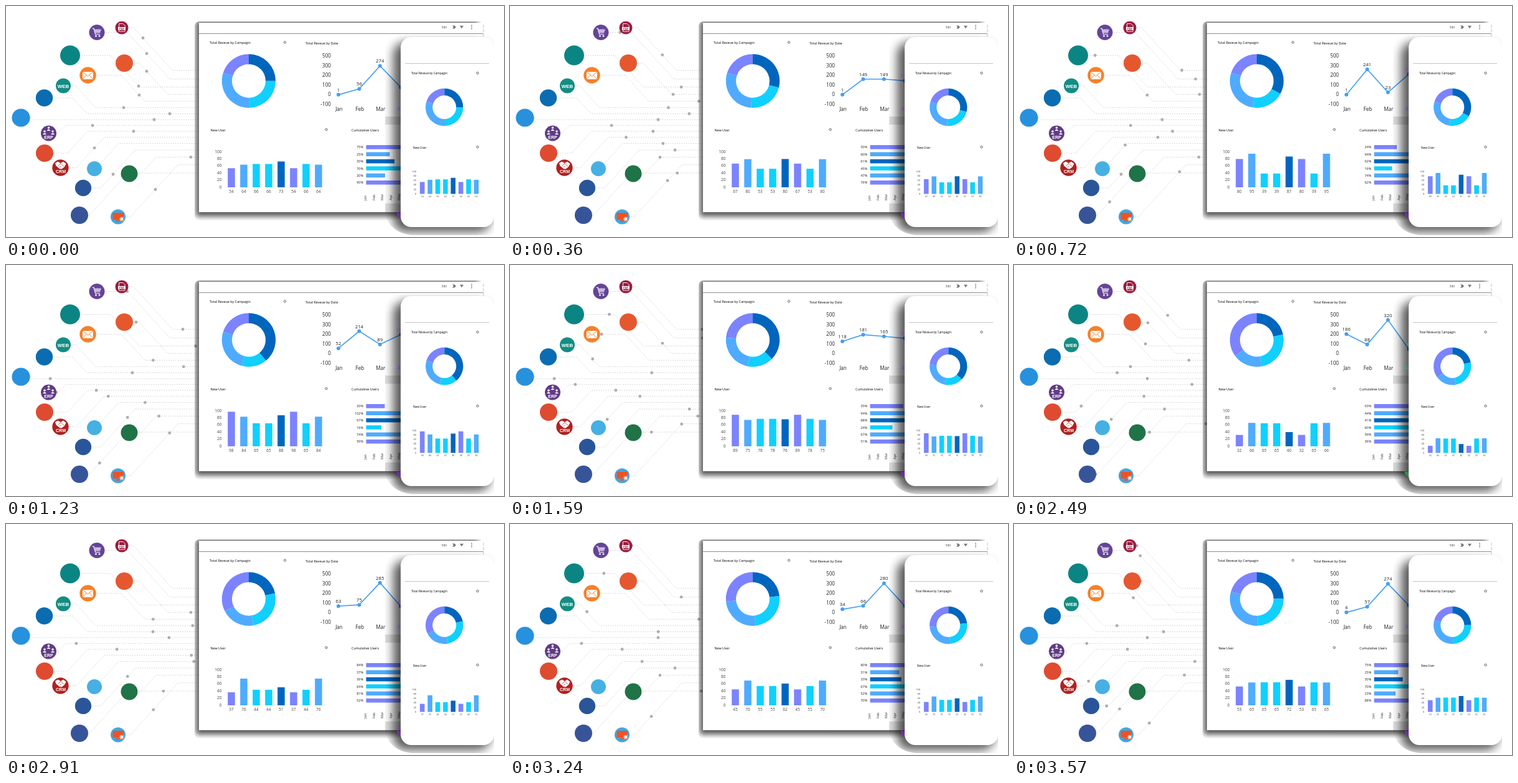
Recreate the animation shown at these times as an HTML page. Size 800 by 372 pixels, loop 3.6 s.

```html
<!DOCTYPE html>
<html lang="en">
<head>
<meta charset="utf-8">
<title>Dashboard</title>
<style>
html, body { margin: 0; width: 100%; height: 100%; overflow: hidden; background: #fff; }
svg { display: block; width: 800px; height: 372px; font-family: "Open Sans", "Noto Sans", sans-serif; }
</style>
</head>
<body>
<svg id="stage" viewBox="0 0 800 372" xmlns="http://www.w3.org/2000/svg">
  <defs>
    <filter id="soft" x="-20%" y="-20%" width="140%" height="140%"><feGaussianBlur stdDeviation="4"/></filter>
    <filter id="wide" x="-30%" y="-20%" width="160%" height="140%"><feGaussianBlur stdDeviation="8"/></filter>
    <clipPath id="winClip"><rect x="303" y="25" width="464" height="320" rx="7"/></clipPath>
    <clipPath id="phoneClip"><path d="M609 64Q612 46 634 47H784V369H652Q620 366 609 338Z"/></clipPath>
  </defs>
  <g id="wires"></g>
  <g id="dots"></g>
  <g id="badges"></g>
  <g clip-path="url(#winClip)"><rect x="305" y="24" width="454" height="315" fill="#000" opacity=".65" filter="url(#soft)"/></g>
  <path d="M310 27H766V332H310Z" fill="#fff"/>
  <path d="M310 44.5H767" stroke="#8c8c8c"/>
  <path d="M767 30V50" stroke="#c4c4c4" stroke-dasharray="5 2"/>
  <g id="panel"></g>
  <path d="M609 178H634V191H609ZM609 318H634V332H609Z" opacity=".12"/>
  <g clip-path="url(#phoneClip)"><rect x="622" y="58" width="156" height="306" rx="20" fill="#000" opacity=".65" filter="url(#wide)"/></g>
  <g id="edge"></g>
  <rect x="634" y="50" width="150" height="306" rx="17" fill="#fff"/>
  <path d="M641 92.5H776" stroke="#b5b5b5" stroke-width=".8"/>
  <g id="phone"></g>
</svg>
<script>
const STEP = 30, FRAMES = 120;
const PURPLE = '#7b83ff', BLUE = '#4fabff', CYAN = '#0fd0ff', NAVY = '#0066bd';
const [wires, dots, badges, panel, edge, phone] =
  ['wires', 'dots', 'badges', 'panel', 'edge', 'phone'].map(id => document.getElementById(id));

function set(el, attrs) {
  for (const k in attrs) el.setAttribute(k, attrs[k]);
  return el;
}
function add(parent, tag, attrs, text = '') {
  const el = set(document.createElementNS('http://www.w3.org/2000/svg', tag), attrs);
  el.textContent = text;
  return parent.appendChild(el);
}
function label(parent, x, y, size, text, anchor = 'start', fill = '#222') {
  return add(parent, 'text', { x, y, 'font-size': size, 'text-anchor': anchor, fill }, text);
}

// A series runs straight through its evenly spaced values and back to the first
function at(values, frame) {
  const p = frame / FRAMES * values.length, i = Math.floor(p);
  return values[i] + (values[(i + 1) % values.length] - values[i]) * (p - i);
}

// ---- sources: badge, wire and travelling dot ----
const PACE = 23, SLOPE = 1.1, WALL = 310;
const lane = d => 183 + 9.4 * d - .07 * d * d + .03 * d ** 3;

// bend: where the wire leaves the badge's level; dot: where its dot is at time zero
function source(order, x, y, r, fill, bend, dot) {
  const end = lane(order - 7), dir = Math.sign(end - y);
  const level = px => px < bend ? y : dir * Math.min(dir * end, dir * y + (px - bend) * SLOPE);
  const flat = bend + Math.abs(end - y) / SLOPE;
  add(wires, 'path', { d: `M${x} ${y}H${bend}L${flat} ${end}H${WALL}`, fill: 'none', stroke: '#c0c0c0', 'stroke-width': .8, 'stroke-dasharray': '1.5 2.2' });
  add(badges, 'circle', { cx: x, cy: y, r, fill });
  const el = add(dots, 'circle', { r: 2.4, fill: '#adadad' });
  const width = WALL - x, laps = Math.round(PACE * FRAMES / width);
  return frame => {
    const px = x + (dot - x + width * laps * frame / FRAMES) % width;
    set(el, { cx: px, cy: level(px) });
  };
}
const flow = [
  [186, 35, 10.5, '#9c1c3f', 205, 220],
  [146, 42.5, 12.5, '#654594', 195, 226],
  [103, 79.5, 16, '#0a8583', 168, 213],
  [190, 92, 14, '#e5582f', 214, 226],
  [131.5, 111.5, 13.2, '#f68029', 185, 214],
  [92, 128.5, 12, '#138d83', 112, 189],
  [61.5, 148, 13.7, '#0b6cb2', 107, 263],
  [24, 180, 14.6, '#2791de', 40, 238],
  [68.5, 205, 12.5, '#603c86', 84, 139],
  [62, 237, 14, '#de4b30', 99, 205],
  [87.5, 260.5, 13.2, '#b1211f', 113, 142],
  [142, 262, 12, '#46b0e3', 144, 145],
  [124, 293, 13.2, '#2a5699', 152, 172],
  [198, 270, 13.5, '#207346', 217, 297],
  [180, 339.5, 12, '#41a7de', 200, 240],
  [118, 337, 14, '#385499', 134, 192]
].map((row, n) => source(n, ...row));

// ---- badge symbols ----
function draw(d, attrs) {
  add(badges, 'path', { d, fill: '#fff', ...attrs });
}
function outline(d, stroke = '#fff', width = 1) {
  draw(d, { fill: 'none', stroke, 'stroke-width': width });
}
function caption(x, y, size, text, fill = '#fff') {
  set(label(badges, x, y, size, text, 'middle', fill), { 'font-weight': 700, 'font-family': 'Liberation Sans, sans-serif' });
}
function spot(cx, cy, r) {
  add(badges, 'circle', { cx, cy, r, fill: '#fff' });
}
outline('M181.5 28.5H188L191 31.5V41H181.5Z', '#fff', .9);
draw('M180 34H192V38.5H180Z');
caption(186, 37.8, 4, 'PDF', '#9c1c3f');

outline('M138.5 36H141L143.5 45.5H151', '#fff', 1.2);
draw('M142 37.5H153L151 43.5H143.6Z', { fill: '#c9b8e6' });
spot(144.5, 48.3, 1.4);
spot(150, 48.3, 1.4);

draw('M123 106H140V118H123Z');
outline('M123 106L131.5 113L140 106M123 118L129 111.5M140 118L134 111.5', '#f68029');

caption(92, 131.5, 8, 'WEB');

for (const [x, y] of [[68.5, 196], [62, 202], [75, 202]]) {
  spot(x, y, 1.8);
  draw(`M${x - 3} ${y + 5}Q${x} ${y} ${x + 3} ${y + 5}Z`);
}
caption(68.5, 213.5, 7, 'ERP');

draw('M79 253L83 250.5L88 253L92 250.5L96.5 254L94 259L89.5 262.5L86 262L80.5 257.5Z');
outline('M84 257L88 253.5L93 258.5M86 260L88.5 257.5', '#b1211f', .8);
caption(88, 269, 7, 'CRM');

draw('M171.5 333H189V344H171.5ZM177 345H183V347H177Z', { fill: '#ee5227' });
spot(186, 343, 3.6);
add(badges, 'circle', { cx: 186, cy: 343, r: 3, fill: 'none', stroke: '#ee5227', 'stroke-width': 1.6, 'stroke-dasharray': '1.4 .95' });

// ---- headings ----
function heading(parent, x, y, size, text, gearX, gearY) {
  set(label(parent, x, y, size, text, 'start', '#000'), { 'font-weight': 500 });
  if (gearX) add(parent, 'circle', { cx: gearX, cy: gearY, r: 1.7, fill: 'none', stroke: '#555', 'stroke-width': .9 });
}
heading(panel, 327, 61, 5.4, 'Total Reveue by Campagin', 448, 58.5);
heading(panel, 481, 62, 5.4, 'Total Reveue by Date');
heading(panel, 328.5, 202, 5.4, 'New User', 514.5, 199);
heading(panel, 555, 202, 5.4, 'Cumulative Users');
heading(phone, 651, 110, 4.75, 'Total Reveue by Campagin', 757.5, 108);
heading(phone, 654, 230, 4.75, 'New User', 757.5, 227);

label(panel, 704, 36, 4.6, 'Edit', 'middle', '#444');
add(panel, 'path', { d: 'M717 31.5H720.5L723 34L720.5 36.5H717L719 34ZM729 31.8H735L732 36.2Z', fill: '#777' });
for (const cy of [31.3, 34, 36.7]) add(panel, 'circle', { cx: 748, cy, r: .8, fill: '#444' });

// ---- rings ----
const cuts = [
  [25, 33, 41.5, 22, 21.5],
  [49.5, 52.5, 54.6, 47, 47],
  [80, 80, 80, 63, 67]
];
function ring(parent, cx, cy, outer, inner) {
  const parts = [NAVY, CYAN, BLUE, PURPLE].map(fill => add(parent, 'path', { fill }));
  const point = (p, r) => {
    const a = p / 50 * Math.PI;
    return `${cx + r * Math.sin(a)} ${cy - r * Math.cos(a)}`;
  };
  return frame => {
    const stops = [0, ...cuts.map(c => at(c, frame)), 100];
    parts.forEach((el, n) => {
      const a = stops[n], b = stops[n + 1];
      set(el, { d: `M${point(a, outer)}A${outer} ${outer} 0 0 1 ${point(b, outer)}L${point(b, inner)}A${inner} ${inner} 0 0 0 ${point(a, inner)}Z` });
    });
  };
}

// ---- columns ----
const users = [
  { fill: PURPLE, values: [54, 80, 105, 29, 36] },
  { fill: BLUE, values: [64, 95, 79, 58, 76] },
  { fill: CYAN, values: [66, 39, 76, 84, 43] },
  { fill: NAVY, values: [73, 87, 88, 32, 50] }
];
function columns(parent, o) {
  for (let v = 0; v <= 100; v += 20)
    label(parent, o.axis, o.base - v * o.scale + o.size / 4, o.size, v, 'end', '#444');
  const cols = [...'01223021'].map((k, n) => {
    const x = o.x + n * o.pitch, { fill, values } = users[k];
    return {
      values,
      bar: add(parent, 'rect', { x: x - o.width / 2, width: o.width, fill }),
      text: label(parent, x, o.base + o.under, o.labelSize, '', 'middle', '#444')
    };
  });
  return frame => cols.forEach(c => {
    const v = at(c.values, frame), h = v * o.scale;
    set(c.bar, { y: o.base - h, height: h });
    c.text.textContent = Math.round(v);
  });
}

// ---- revenue line ----
const months = ['Jan', 'Feb', 'Mar', 'Apr', 'May'];
const sales = [
  [1, 1, 73, 288, 66],
  [56, 241, 203, 98, 76],
  [274, 23, 116, 350, 285],
  [71, 195, 177, 30, 60]
];
const tone = frame => {
  const green = Math.max(0, 1 - Math.abs(frame - 83) / 15);
  return `rgb(${132 - 82 * green}, ${40 + 140 * green}, ${216 - 140 * green})`;
};
function revenue() {
  [500, 300, 200, 100, 0, -100].forEach((v, n) => label(panel, 522, 83 + n * 15.6, 8.2, v, 'end'));
  const line = add(panel, 'polyline', { fill: 'none', stroke: '#459ff5', 'stroke-width': 1.7 });
  const marks = sales.map((values, n) => {
    const x = 534 + n * 33.4, host = n < 3 ? panel : edge;
    return {
      values, x,
      month: label(host, x + 1, 168.7, 8.1, months[n], 'middle'),
      dot: add(panel, 'circle', { cx: x, r: 3, fill: '#459ff5' }),
      text: label(host, x, 0, 7.8, '', 'middle')
    };
  });
  const corner = add(edge, 'path', { d: 'M627 332.5H636V342Q628 339 627 332.5Z', opacity: .7 });
  const tinted = [marks[3].month, marks[3].text, corner];
  return frame => {
    const pts = marks.map(m => {
      const v = at(m.values, frame), y = 143 - v * .17;
      set(m.dot, { cy: y });
      set(m.text, { y: y - 5 }).textContent = Math.round(v);
      return [m.x, y];
    });
    set(line, { points: pts.join(' ') });
    tinted.forEach(el => set(el, { fill: tone(frame) }));
  };
}

// ---- horizontal bars ----
function totals() {
  const rows = [
    [PURPLE, [75, 24, 18, 100, 84]],
    [BLUE, [25, 94, 105, 50, 37]],
    [NAVY, [30, 92, 99, 46, 36]],
    [CYAN, [70, 19, 15, 56, 64]],
    [BLUE, [20, 74, 74, 38, 84]],
    [PURPLE, [90, 62, 58, 25, 50]]
  ].map(([fill, values], n) => {
    const y = 227.3 + n * 11.4;
    return {
      values,
      bar: add(panel, 'rect', { x: 578.5, y: y - 3.3, height: 6.6, fill }),
      text: label(panel, 574, y + 2, 5.5, '', 'end')
    };
  });
  months.forEach((m, n) => {
    const x = 579 + n * 13.5;
    set(label(panel, x, 313, 5.6, m, 'start', '#333'), { transform: `rotate(-90 ${x} 313)` });
  });
  return frame => rows.forEach(r => {
    const v = at(r.values, frame);
    set(r.bar, { width: Math.min(v * 1.52, 60) });
    r.text.textContent = Math.round(v) + '%';
  });
}

const parts = [
  ...flow,
  ring(panel, 390, 120.7, 43.2, 27),
  ring(phone, 704.2, 163, 30.2, 19),
  columns(panel, { x: 362, pitch: 20, width: 11.5, base: 292, scale: .57, axis: 346.5, size: 6.5, under: 8.8, labelSize: 6.4 }),
  columns(phone, { x: 668.7, pitch: 12.4, width: 7.6, base: 302.6, scale: .355, axis: 659, size: 4, under: 5.4, labelSize: 3.6 }),
  revenue(),
  totals()
];

function render(ms) {
  const frame = Math.floor(ms / STEP) % FRAMES;
  parts.forEach(update => update(frame));
}
let start;
function tick(now) {
  start ??= now;
  render(now - start);
  requestAnimationFrame(tick);
}
render(0);
requestAnimationFrame(tick);
</script>
</body>
</html>
```
